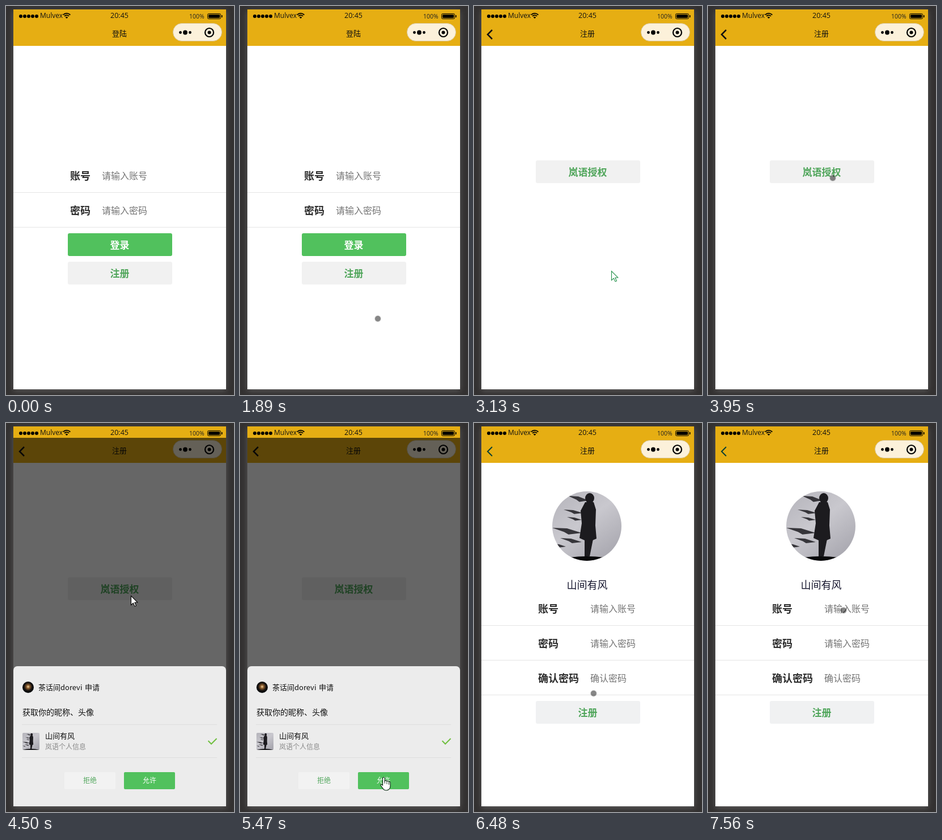
Animation, 402 px wide and 683 px high, one loop 8000 ms. Source, as an HTML page with a canvas:

```html
<!DOCTYPE html>
<html lang="zh">
<head>
<meta charset="utf-8">
<title>登陆</title>
<style>
html, body { margin: 0; width: 100%; height: 100%; overflow: hidden; background: #333131; }
canvas { display: block; width: 402px; height: 683px; }
</style>
</head>
<body>
<canvas id="stage"></canvas>
<script>
const W = 402, H = 683, LOOP = 8000;
const CJK = '"Noto Sans CJK SC", "Noto Sans CJK", sans-serif';
const LATIN = '"Open Sans", "Noto Sans", sans-serif';
const GREEN = '#51c15d', INK = '#2c2c2c', HINT = '#757575', LEAF = '#4fa55a';
const NICK = '山间有风', BRAND = '岚语';

const canvas = document.getElementById('stage');
const ratio = window.devicePixelRatio || 1;
canvas.width = W * ratio;
canvas.height = H * ratio;
const c = canvas.getContext('2d');

// y is the optical middle of the line
function text(s, x, y, size, color, { weight = 400, align = 'left', font = CJK } = {}) {
  c.font = `${weight} ${size}px ${font}`;
  c.textAlign = align;
  c.fillStyle = color;
  c.fillText(s, x, y + size * 0.37);
}

function rect(x, y, w, h, color) {
  c.fillStyle = color;
  c.fillRect(x, y, w, h);
}

function round(x, y, w, h, r, color, line) {
  c.beginPath();
  c.roundRect(x, y, w, h, r);
  if (color) { c.fillStyle = color; c.fill(); }
  if (line) { c.strokeStyle = line; c.lineWidth = 1; c.stroke(); }
}

function disc(x, y, r, color) {
  c.beginPath();
  c.arc(x, y, r, 0, 7);
  c.fillStyle = color;
  c.fill();
}

function poly(points, closed) {
  c.beginPath();
  points.forEach(([x, y]) => c.lineTo(x, y));
  if (closed) c.closePath();
}

function stroke(color, width) {
  c.strokeStyle = color;
  c.lineWidth = width;
  c.stroke();
}

function button(y, label, fill = '#f1f1f1', color = LEAF) {
  round(109, y, 184, 40, 3, fill);
  text(label, 200.5, y + 21, 17, color, { weight: 700, align: 'center' });
}

function field(y, label, x, hint) {
  text(label, 113, y, 18, INK, { weight: 700 });
  text(hint, x, y, 16, HINT);
  rect(13, y + 29, 375, 1, '#e5e5e5');
}

function statusBar() {
  rect(13, 6, 375, 20, '#e6ae13');
  for (let i = 0; i < 5; i++) disc(26 + i * 7, 18, 3, '#000');
  text('Mulvex', 60, 17, 12, '#111', { font: LATIN });
  for (const r of [8.6, 5.4]) {
    c.beginPath();
    c.arc(107, 21.5, r, -Math.PI * 0.76, -Math.PI * 0.24);
    stroke('#000', 1.8);
  }
  c.beginPath();
  c.moveTo(107, 22);
  c.arc(107, 22, 3, -Math.PI * 0.78, -Math.PI * 0.22);
  c.fillStyle = '#000';
  c.fill();
  text('20:45', 200, 16.5, 12.5, '#111', { align: 'center', font: LATIN });
  text('100%', 323, 18, 10.5, '#222', { font: LATIN });
  round(355.5, 13.5, 23, 9, 2, null, '#000');
  round(357, 15, 20, 6, 1, '#000');
  rect(380, 16, 1.5, 4, '#000');
}

function navBar(title, back, thin) {
  rect(13, 25, 375, 45, '#e6ae13');
  text(title, 200, 48, 13, '#111', { align: 'center' });
  if (back) {
    poly([[32, 42], [24, 50], [32, 58]]);
    stroke(thin ? '#0b4034' : '#111', thin ? 2 : 2.5);
  }
  round(294.5, 30.5, 86, 31, 15.5, '#fcf1da', '#d9c798');
  disc(307.5, 46.5, 2.4, '#000');
  disc(316, 46.5, 3.9, '#000');
  disc(324.5, 46.5, 2.4, '#000');
  c.beginPath();
  c.arc(358.5, 46.5, 7.5, 0, 7);
  stroke('#000', 2.2);
  disc(358.5, 46.5, 3, '#000');
}

function loginPage() {
  rect(13, 70, 375, 603, '#fff');
  field(298, '账号', 169, '请输入账号');
  field(359, '密码', 169, '请输入密码');
  button(399, '登录', GREEN, '#fff');
  button(449, '注册');
}

function grantPage(pressed) {
  rect(13, 70, 375, 603, '#fff');
  button(271, BRAND + '授权', pressed ? '#dedede' : '#f1f1f1');
}

// Windy sky with a plain standing silhouette, on a 122 unit square
function portrait(x, y, size, r) {
  c.save();
  round(x, y, size, size, r);
  c.clip();
  c.translate(x, y);
  c.scale(size / 122, size / 122);
  const sky = c.createLinearGradient(0, 0, 90, 122);
  sky.addColorStop(0, '#b4b3ba');
  sky.addColorStop(0.5, '#c9c8ce');
  sky.addColorStop(1, '#a9a8b0');
  rect(0, 0, 122, 122, sky);
  c.fillStyle = '#36353a';
  for (const [sx, sy, w, h] of [[28, 8, 36, 8], [20, 32, 34, 6], [26, 45, 26, 5], [0, 64, 52, 9], [14, 82, 38, 7], [0, 92, 24, 5]]) {
    poly([[sx, sy], [sx + w * 0.5, sy + 1], [sx + w, sy + h], [sx + w * 0.55, sy + h * 1.3], [sx + w * 0.4, sy + h * 0.8]], true);
    c.fill();
  }
  c.fillStyle = '#1c1b1f';
  c.beginPath();
  c.ellipse(66, 12, 8, 9, 0, 0, 7);
  c.fill();
  poly([[58, 19], [73, 19], [77, 32], [76, 60], [78, 83], [71, 86], [67, 86], [64, 114], [57, 115], [57, 86], [48, 82], [52, 56], [50, 34]], true);
  c.fill();
  poly([[66, 84], [72, 84], [66, 114], [60, 114]], true);
  c.fill();
  c.beginPath();
  c.moveTo(0, 122);
  c.quadraticCurveTo(61, 106, 122, 122);
  c.fillStyle = '#09090b';
  c.fill();
  c.restore();
}

function signupPage(withPhoto, caret) {
  rect(13, 70, 375, 603, '#fff');
  if (withPhoto) portrait(138, 120, 122, 61);
  text(NICK, 199.5, 284, 18, '#14142c', { align: 'center' });
  field(326, '账号', 205, '请输入账号');
  field(387, '密码', 205, '请输入密码');
  field(448, '确认密码', 205, '确认密码');
  button(488, '注册', '#f0f1f2');
  if (caret) rect(205, 315, 1, 21, '#222');
}

function shade(alpha) {
  rect(13, 26, 375, 647, `rgba(0,0,0,${alpha})`);
}

function sheet() {
  shade(0.6);
  round(13, 427, 375, 246, [7, 7, 0, 0], '#ececec');
  const glow = c.createRadialGradient(39, 463, 0, 39, 463, 10);
  glow.addColorStop(0, '#f3d9a4');
  glow.addColorStop(0.3, '#8a5a2c');
  glow.addColorStop(0.7, '#14110f');
  glow.addColorStop(1, '#080a0c');
  disc(39, 464, 10, glow);
  text('茶话间dorevi', 57, 464, 13, '#111');
  text('申请', 139, 464, 13, '#111');
  text('获取你的昵称、头像', 29, 508, 14, '#111');
  rect(28, 529, 344, 1, '#dedede');
  portrait(29, 544, 30, 2);
  text(NICK, 69, 549, 13, '#111');
  text(BRAND + '个人信息', 69, 569, 12, '#8a8a8a');
  poly([[356.5, 558], [362, 563.5], [371.5, 554]]);
  stroke('#6fbf3f', 2);
  rect(28, 587, 344, 1, '#dedede');
  round(103, 613, 90, 30, 2, '#f2f2f2');
  text('拒绝', 148, 628, 12, LEAF, { align: 'center' });
  round(208, 613, 90, 30, 2, GREEN);
  text('允许', 253, 628, 12, '#fff', { align: 'center' });
}

function arrow(x, y, line) {
  c.save();
  c.translate(x + 0.5, y + 0.5);
  poly([[0, 0], [0, 16], [3.8, 12.6], [6.6, 18.4], [9, 17.3], [6.4, 11.8], [11.3, 11.4]], true);
  c.fillStyle = '#fff';
  c.fill();
  stroke(line, 1.1);
  c.restore();
}

function hand(x, y) {
  c.save();
  c.translate(x, y);
  c.beginPath();
  c.moveTo(-1.5, 14);
  c.lineTo(-1.5, 1.5);
  c.quadraticCurveTo(0.3, -1.5, 2.2, 1.5);
  c.lineTo(2.2, 6.5);
  c.quadraticCurveTo(4.5, 4.5, 6, 7);
  c.quadraticCurveTo(8.5, 5.5, 9.5, 8);
  c.quadraticCurveTo(12, 7, 12, 10);
  c.lineTo(12, 16);
  c.quadraticCurveTo(11.5, 22.5, 5, 23);
  c.quadraticCurveTo(0.5, 23, -1.5, 19);
  c.lineTo(-5, 14);
  c.quadraticCurveTo(-5, 10.5, -1.5, 14);
  c.closePath();
  c.fillStyle = '#fff';
  c.fill();
  stroke('#12301a', 1.2);
  for (const [lx, ly] of [[2.2, 6], [6, 7], [9.5, 8]]) {
    poly([[lx, ly], [lx, ly + 5]]);
    stroke('#12301a', 1);
  }
  c.restore();
}

// time, x, y
const PATH = [
  [990, 336, 633], [1250, 298, 570], [1540, 250, 482], [1750, 244, 545],
  [1820, 237, 556], [1890, 243, 549], [2230, 377, 351], [2590, 242, 465],
  [3400, 242, 465], [3950, 220, 302], [4500, 220, 303], [4770, 220, 303],
  [5470, 253, 622], [6270, 253, 622], [6760, 146, 248], [7030, 239, 329]
];

function pointer(t) {
  const i = PATH.findIndex(k => k[0] > t);
  if (i < 0) return PATH[PATH.length - 1].slice(1);
  const [t0, x0, y0] = PATH[i - 1], [t1, x1, y1] = PATH[i];
  const p = (t - t0) / (t1 - t0), e = p * p * (3 - 2 * p);
  return [x0 + (x1 - x0) * e, y0 + (y1 - y0) * e];
}

function drawPointer(t) {
  if (t < 990) return;
  const [x, y] = pointer(t);
  if (t >= 2790 && t < 3400) arrow(x, y, '#23904a');
  else if (t >= 4500 && t < 6270) y > 612 ? hand(x, y) : arrow(x, y, '#000');
  else {
    disc(x, y, 6, 'rgba(0,0,0,.12)');
    disc(x, y, 5, 'rgba(0,0,0,.4)');
  }
}

function page(t) {
  if (t < 3130) loginPage();
  if (t >= 2790 && t < 6000) {
    const p = Math.min(1, (t - 2720) / 410);
    c.save();
    c.translate(375 * Math.pow(1 - p, 2), 0);
    grantPage(t >= 3810 && t < 3950);
    c.restore();
  }
  if (t >= 6000) signupPage(t >= 6070, t >= 7030 && t < 7560);
}

function draw(t) {
  c.setTransform(ratio, 0, 0, ratio, 0, 0);
  rect(0, 0, W, H, '#333131');
  c.save();
  c.shadowColor = 'rgba(150,150,150,.4)';
  c.shadowBlur = 10 * ratio;
  c.shadowOffsetY = 3 * ratio;
  rect(13, 6, 375, 667, '#fff');
  c.restore();

  c.save();
  c.beginPath();
  c.rect(13, 6, 375, 667);
  c.clip();
  page(t);
  navBar(t < 2790 ? '登陆' : '注册', t >= 2790, t >= 5600);
  if (t >= 4500 && t < 5600) sheet();
  else if (t >= 5600 && t < 5670) shade(0.25);
  statusBar();
  drawPointer(t);
  c.restore();
}

let start;
function tick(now) {
  start ??= now;
  draw((now - start) % LOOP);
  requestAnimationFrame(tick);
}
requestAnimationFrame(tick);
</script>
</body>
</html>
```
